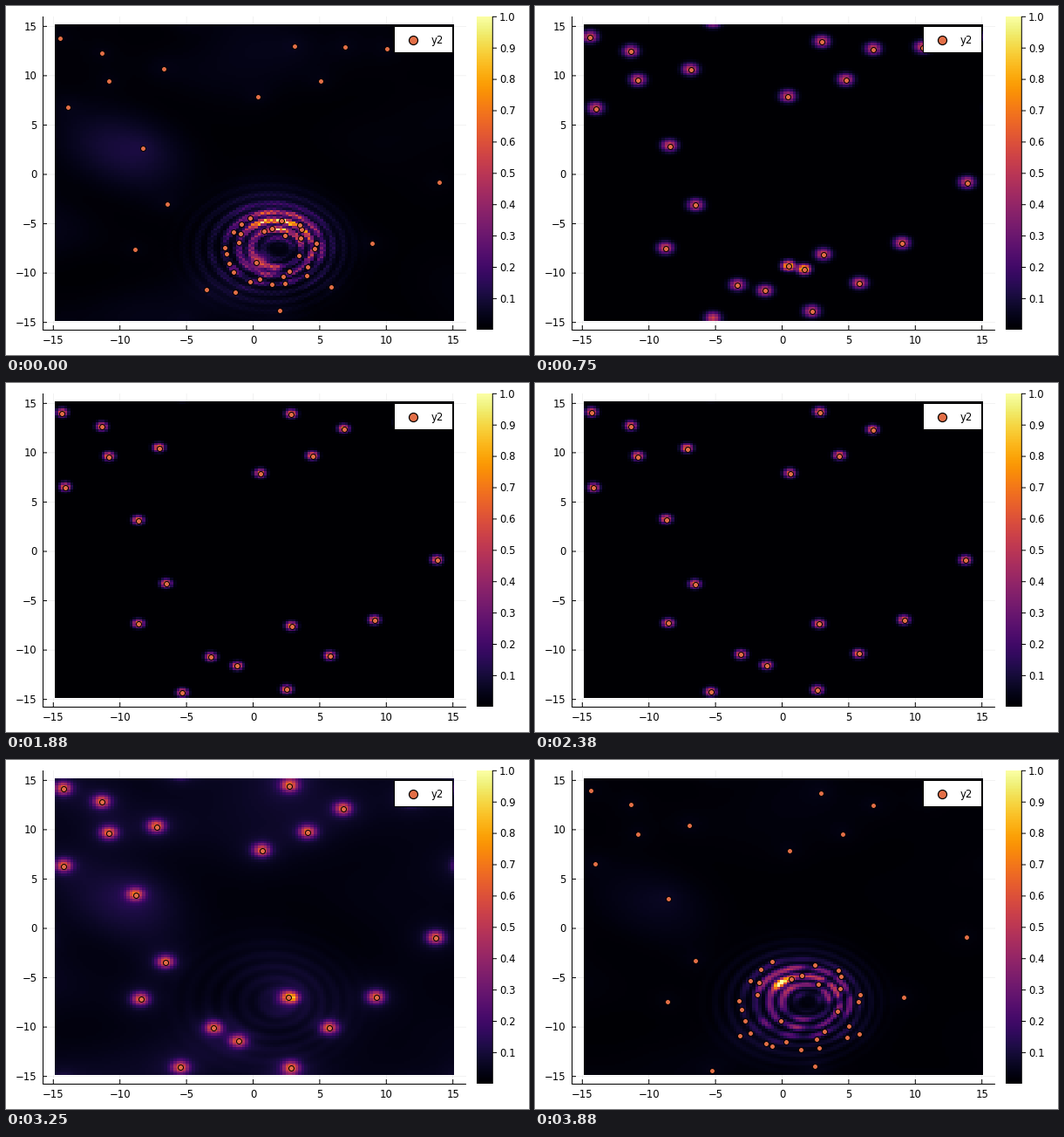
Write a matplotlib script that moves like this. It is 600 px wide and 400 px high and loops after 4010 ms.

```python
import numpy as np
import matplotlib.pyplot as plt
from matplotlib.animation import FuncAnimation
from matplotlib.patches import Rectangle

plt.rcParams["font.family"] = "DejaVu Sans"
W, H, LOOP_MS = 600, 400, 4010
STEPS, TICKS = 32, 4  # pictures per loop, timer ticks per picture
STEP_MS = 125
PX = 0.72  # one pixel in points
ORANGE = "#E36F47"
CELLS = 128


def to_px(x, y):
    return 283.5 + 15.28 * x, 193 - 11.31 * y


def to_data(p):
    return (p[0] - 283.5) / 15.28, (193 - p[1]) / 11.31


def key(n, times, values):
    return float(np.interp(n, times, values))


# Where each vortex starts and how far it drifts, in pixels: x, y, dx, dy.
VORTICES = np.array([
    (62, 37, 4, -4), (110, 54, 0, -6), (118, 86, 0, -2), (181, 72, -9, 5),
    (71, 116, -5, 6), (157, 163, -9, -9), (185, 227, -2, 5), (148, 279, 7, -5),
    (289, 104, 5, 0), (331, 46, -6, -17), (389, 47, -2, 10), (361, 86, -16, -3),
    (437, 49, 30, -5), (497, 202, -4, 2), (420, 272, 5, 0), (373, 322, -2, -16),
    (314, 349, 14, 4), (230, 325, 9, -19), (263, 328, 4, -6),
    (334, 290, -11, -19), (206, 360, -6, -8)], float)
CORE, EDGE = 19, 20
PAIR = [(291, 298), (309, 302)]

axis = -15 + 30 / CELLS * np.arange(1, CELLS + 1)
X, Y = np.meshgrid(axis, axis)
CHECKER = (-1.0) ** np.add.outer(np.arange(CELLS), np.arange(CELLS))
DX, DY = X - 2, Y + 7.5
ANGLE = np.arctan2(DY, DX)
RADIUS = np.hypot(DX, DY) + .12 * DX


def interference(seed, scale, waves=7):
    """Intensity of a few random plane waves, about 1 on average."""
    rng = np.random.default_rng(seed)
    heading, phase = rng.uniform(0, 2 * np.pi, (2, waves))
    k = scale * rng.uniform(.4, 1, waves)
    total = sum(np.exp(1j * (a * (X * np.cos(h) + Y * np.sin(h)) + p))
                for a, h, p in zip(k, heading, phase))
    return np.abs(total) ** 2 / waves


HAZE = interference(3, .5) * (.35 + .65 / (1 + np.exp((X - 1) / 3)))
SPECKLE = np.clip(interference(8, 2.2), 0, 1.8)


def stirring(n):
    """Strength of the turbulent patch: dies out early, returns at the end."""
    return max(np.clip(1 - n / 6, 0, 1) ** 1.6, np.clip((n - 28) / 3, 0, 1) ** 1.2)


def positions(n):
    s = (n / 28) ** .85 if n <= 28 else 1 - (n - 28) / 6
    return VORTICES[:, :2] + s * VORTICES[:, 2:]


def distance2(p):
    """Squared distance to a pixel position on the periodic box."""
    x, y = to_data(p)
    wrap = lambda d: (d + 15) % 30 - 15
    return wrap(X - x) ** 2 + wrap(Y - y) ** 2


def spot(p, height, sigma):
    return height * np.exp(-distance2(p) / (2 * sigma ** 2))


def rings(n):
    late = n > STEPS / 2
    phase, heading, sharp = (2.6, 2.4, 7) if late else (2.75, 1.66, 2)
    facing = np.clip(np.cos(ANGLE - heading), 0, 1) ** sharp
    wave = .12 + .88 * (.5 + .5 * np.cos(2 * np.pi * (RADIUS - phase) / .9))
    shell = np.exp(-((RADIUS - 2.5) / 1.35) ** 2)
    ripple = .05 * np.exp(-((RADIUS - 4.8) / 1.7) ** 2)
    field = wave * (shell * (.5 * facing + .12 + .2 * SPECKLE) + ripple)
    if late:
        return field + spot((281, 257), .45, .3)
    return field * (1 + .2 * CHECKER) + spot((290, 292), .35, .5)


def density(n):
    points = positions(n)
    height = key(n, [0, 6, 11, 19, 28, 31], [0, .55, .78, .68, .5, 0])
    sigma = key(n, [0, 6, 11, 19, 28], [.5, .4, .26, .29, .45])
    swell = key(n, [0, 2, 5, 24, 28, 31], [.1, .5, 0, 0, 1, .1])
    haze = key(n, [0, 5, 24, 28, 31], [.022, 0, 0, .035, .01])

    field = haze * HAZE + stirring(n) * rings(n)
    for i, p in enumerate(points):
        if i != CORE or 3 <= n <= 28:
            r2 = distance2(p)
            field += height * np.exp(-r2 / (2 * sigma ** 2)) + .2 * swell / (1 + r2 / 1.1)
    merging = key(n, [3, 6, 11, 13], [.2, 1, .07, 0])
    for p in PAIR:
        field += spot(p, merging, .32)
    if n > STEPS / 2:
        wave = np.cos(2 * np.pi * RADIUS / 1.2) * np.exp(-((RADIUS - 3) / 3.5) ** 2)
        field += swell * (.025 * wave + spot((330, 273), .75, .33) + spot((316, 285), .08, 1))
    return np.clip(field, 0, 1)


def stirred_markers(n):
    """Short-lived vortices around the patch, a third of them inside it."""
    late = n > STEPS / 2
    rng = np.random.default_rng(5)
    angles = rng.permutation(28) * 2 * np.pi / 28 + rng.normal(0, .08, 28)
    radii = (4.5 if late else 3.4) * rng.normal(1, .06, 28)
    radii[::3] *= rng.uniform(.4, .8, 10)
    count = round(28 * stirring(n))
    x, y = to_px(1.3 + radii * np.cos(angles), -7.7 + radii * np.sin(angles))
    return np.column_stack([x, y])[:count]


def markers(n):
    shown = np.full(len(VORTICES), True)
    shown[CORE] = 3 <= n <= 28
    shown[EDGE] = n >= 14
    pair = PAIR if 4 <= n <= 8 else np.empty((0, 2))
    return np.concatenate([positions(n)[shown], pair, stirred_markers(n)])


fig = plt.figure(figsize=(W / 100, H / 100), dpi=100, facecolor="white")
ax = fig.add_axes([0, 0, 1, 1])


def line(xs, ys, **style):
    ax.plot(xs, ys, **{"color": "black", "lw": PX, "solid_capstyle": "butt",
                       "snap": False, **style})


def label(x, y, text, ha):
    ax.text(x, y + 4.3, text, ha=ha, va="baseline", fontsize=8.4, zorder=5)


def image(data, box):
    return ax.imshow(data, cmap="inferno", vmin=0, vmax=1, origin="lower", extent=box,
                     aspect="auto", interpolation="nearest", zorder=1)


for v in range(-15, 16, 5):
    x, y = to_px(v, v)
    name = str(v).replace("-", "\u2212")
    line([x, x], [12, 371], alpha=.1, lw=.5 * PX, zorder=0)
    line([42, 528], [y, y], alpha=.1, lw=.5 * PX, zorder=0)
    line([x, x], [371, 366])
    line([42, 47], [y, y])
    label(x, 383, name, "center")
    label(35.5, y, name, "right")
line([42.5, 42.5], [12, 372])
line([42, 528], [371.5, 371.5])

image(np.linspace(0, 1, 256)[:, None], (540, 558, 371, 12))
line([558.3, 558.3], [12, 371])
for k in range(1, 11):
    y = 371.3 - 35.9 * k
    line([558, 563], [y, y])
    label(566, y, f"{k / 10:.1f}", "left")

heat = image(density(0), (56, 514, 361, 21))
dots, = ax.plot([], [], "o", ms=6 * PX, mfc=ORANGE, mec="black", mew=PX, zorder=3)

ax.add_patch(Rectangle((445.5, 23.5), 67, 30, fc="white", ec="black", lw=PX,
                       snap=False, zorder=4))
ax.plot([467], [39], "o", ms=10 * PX, mfc=ORANGE, mec="black", mew=1.2 * PX, zorder=5)
label(488, 39, "y2", "left")
ax.set(xlim=(0, W), ylim=(H, 0))
ax.axis("off")


def draw(tick):
    elapsed = (tick + 1) * LOOP_MS / (STEPS * TICKS)
    n = min(int(elapsed / STEP_MS), STEPS - 1)
    heat.set_data(density(n))
    dots.set_data(*markers(n).T)
    return heat, dots


anim = FuncAnimation(fig, draw, frames=STEPS * TICKS, interval=LOOP_MS / (STEPS * TICKS),
                     repeat=True, repeat_delay=0, blit=False)
plt.show()
```
